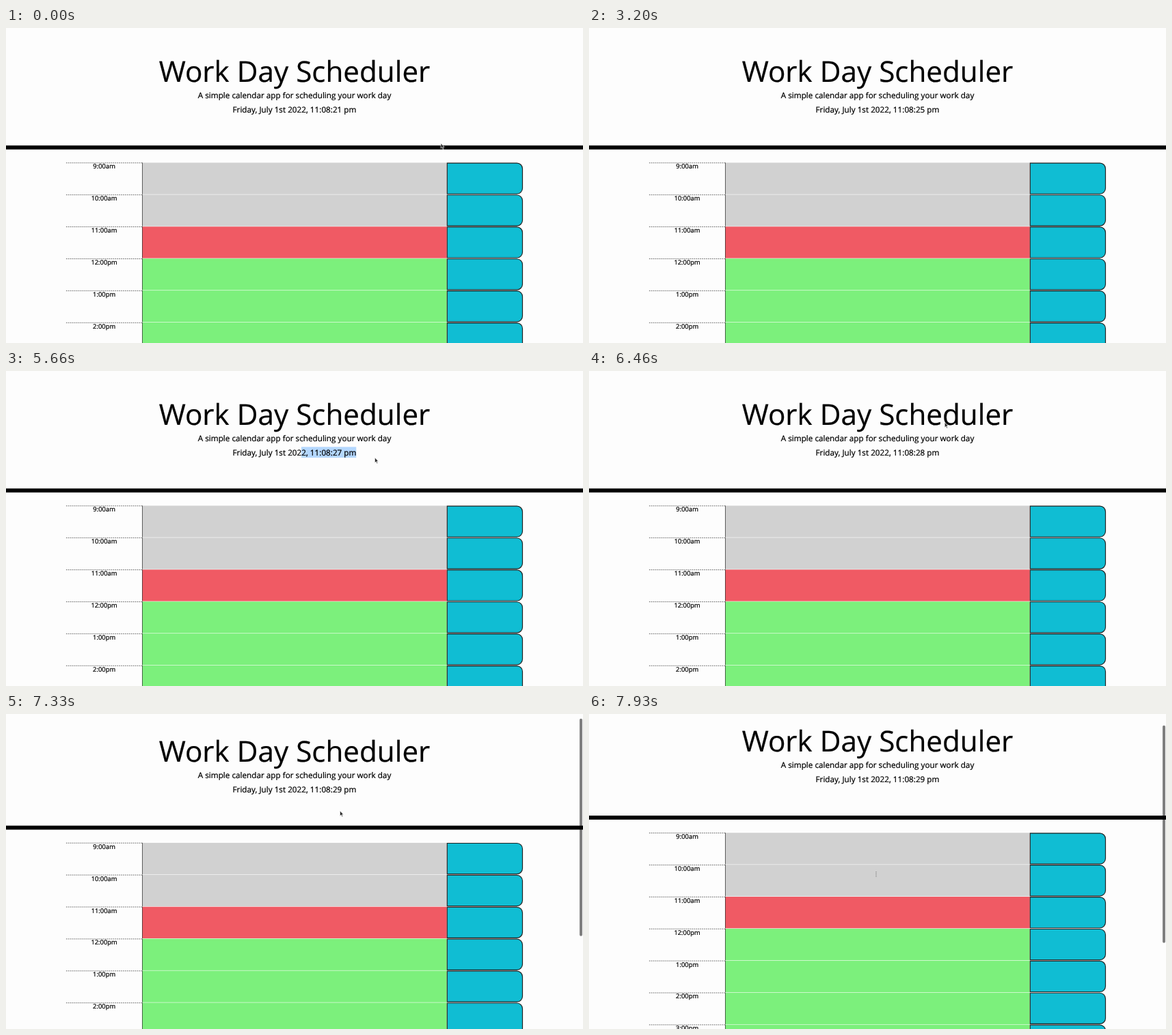
An HTML page for the animation above (8000 ms loop, 844 by 462 pixels).

```html
<!DOCTYPE html>
<html lang="en">
<head>
<meta charset="utf-8">
<title>Work Day Scheduler</title>
<style>
  html, body { margin: 0; width: 100%; height: 100%; overflow: hidden; background: #fdfdfd; }
  #stage { position: relative; width: 844px; height: 462px; overflow: hidden; }
  #page {
    position: absolute; left: 0; top: 0; width: 1440px; transform-origin: 0 0;
    font: 16px/1 "Open Sans", sans-serif; color: #000;
    text-rendering: geometricPrecision; -webkit-text-stroke: .4px #000;
  }
  header {
    box-sizing: border-box; height: 304.4px; padding-top: 64px; margin-bottom: 32px;
    border-bottom: 10px solid #000; text-align: center;
  }
  h1 { margin: 0 0 8px; font-size: 72px; font-weight: 400; line-height: 1.2; }
  p { margin: 0 0 16px; font-size: 20px; line-height: 20px; white-space: pre; }
  #picked { background: #b4d7fe; }
  .row {
    box-sizing: border-box; display: flex; width: 1140px; height: 80px; margin: 0 auto;
    border-top: 1px solid #fff;
  }
  .row > * { box-sizing: border-box; height: 79px; }
  .hour { width: 190px; border-top: 1px dashed #000; text-align: center; }
  .slot { width: 760px; border-left: 1px solid #000; background: #7cf07c; }
  .past { background: #d1d1d1; }
  .present { background: #f05a64; }
  .save {
    width: 190px; border: 2px solid #222;
    border-radius: 0 15px 15px 0; background: #10bdd3;
  }
  #thumb {
    position: absolute; left: 838.5px; top: 0; width: 4.7px; height: 319px;
    border-radius: 2.4px; background: rgba(0, 0, 0, .5);
  }
  #pointer { position: absolute; left: 0; top: 0; overflow: visible; }
</style>
</head>
<body>
<div id="stage">
  <div id="page">
    <header>
      <h1>Work Day Scheduler</h1>
      <p>A simple calendar app for scheduling your work day</p>
      <p><span id="plain"></span><span id="picked"></span></p>
    </header>
    <main id="rows"></main>
  </div>
  <div id="thumb"></div>
  <svg id="pointer" width="10" height="12">
    <path id="arrow" d="M0 0V7.6L1.8 6L3 8.8L4.2 8.3L3 5.6H5.2Z"
      fill="#2a2a2a" stroke="#fff" stroke-width=".6"/>
    <path id="beam" d="M0 -4V4" stroke="#777" stroke-dasharray="1.2 1"/>
  </svg>
</div>
<script>
const LOOP = 8000, STEP = 200 / 3, SCALE = 844 / 1440;
const $ = id => document.getElementById(id);
const progress = (t, from, to) => Math.min(1, Math.max(0, (t - from) / (to - from)));
const show = (id, visible) => { $(id).style.display = visible ? "" : "none"; };

const DRAG = { from: 5333, to: 5467, cleared: 6390 };
const home = { x: 636, y: 169 };
// Each glide moves the pointer to x, y; lift bows the path upwards.
const glides = [
  { from: 0, to: 267, x: 746.5, y: 51, lift: 75 },
  { from: 4400, to: 5267, x: 540, y: 122, lift: 40 },
  { from: DRAG.from, to: DRAG.to, x: 433, y: 120, lift: 0 },
  { from: DRAG.to, to: 5667, x: 539.5, y: 127, lift: 0 },
  { from: 6133, to: 6933, x: 488.5, y: 142, lift: 62 },
  { from: 7467, to: 7867, x: 420, y: 235, lift: 0 }
];

function pointerAt(t) {
  let { x, y } = home;
  for (const glide of glides) {
    const u = progress(t, glide.from, glide.to);
    const eased = u * u * (3 - 2 * u);
    x += (glide.x - x) * eased;
    y += (glide.y - y) * eased - glide.lift * Math.sin(Math.PI * eased);
  }
  return { x, y };
}

const scrollAt = t => 29 * (1 - Math.exp(-Math.max(0, t - 7168) / 471));

function addRow(hour) {
  const label = `${(hour + 11) % 12 + 1}:00${hour < 12 ? "am" : "pm"}`;
  const state = hour < 11 ? "past" : hour === 11 ? "present" : "future";
  $("rows").insertAdjacentHTML("beforeend",
    `<div class="row"><div class="hour">${label}</div><div class="slot ${state}"></div><div class="save"></div></div>`);
}
for (let hour = 9; hour <= 17; hour++) addRow(hour);

function drawClock(t) {
  const seconds = 21 + Math.floor((t + 801) / 1000);
  const text = `Friday, July 1st 2022, 11:08:${seconds} pm`;
  const dragged = t < DRAG.cleared ? progress(t, DRAG.from, DRAG.to) : 0;
  const fullPick = text.length - text.indexOf("2, ");
  const start = text.length - Math.round(fullPick * dragged);
  $("plain").textContent = text.slice(0, start);
  $("picked").textContent = text.slice(start);
}

function drawPointer(t, scroll) {
  const { x, y } = pointerAt(t);
  const overClock = y > 113 && y < 126 && x > 331 && x < 513;
  const overSlot = y > 198 - scroll && x > 199 && x < 645;
  show("arrow", !overClock && !overSlot);
  show("beam", overClock || overSlot);
  show("pointer", t < 2130 || t > 4460);
  $("pointer").style.transform = `translate(${x}px, ${y}px)`;
}

function draw() {
  const now = performance.now() % LOOP;
  const t = Math.floor((now + 7) / STEP) * STEP % LOOP;
  const scroll = scrollAt(t);
  $("page").style.transform = `translateY(${-scroll}px) scale(${SCALE})`;
  show("thumb", scroll > 0);
  $("thumb").style.transform = `translateY(${0.8 + scroll * 0.69}px)`;
  drawClock(t);
  drawPointer(t, scroll);
  requestAnimationFrame(draw);
}
draw();
</script>
</body>
</html>
```
